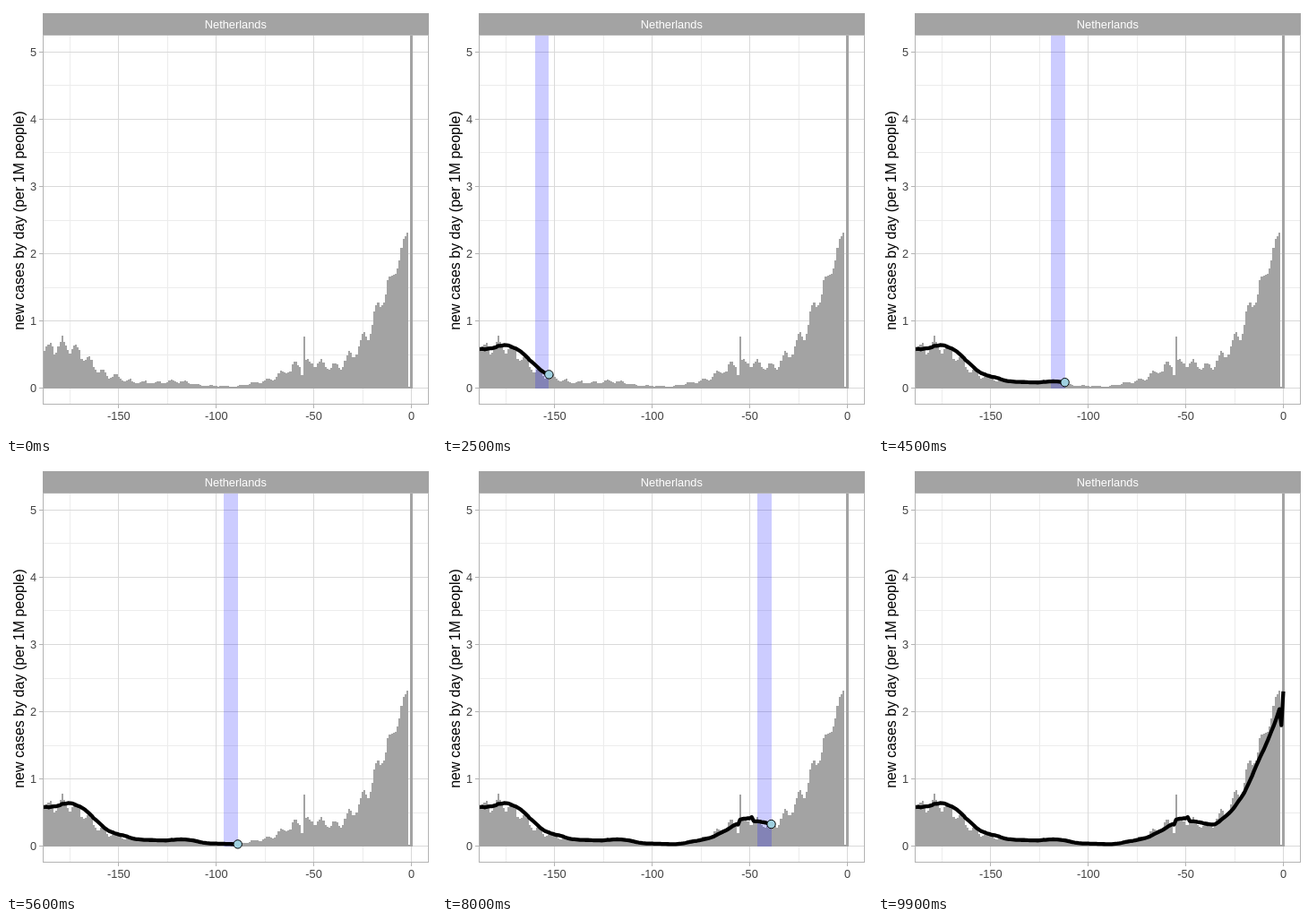
An HTML page with a canvas that plays this animation: 480x480 px, repeating every 10 s.

```html
<!DOCTYPE html>
<html lang="en">
<head>
<meta charset="utf-8">
<title>New cases by day</title>
<style>
html, body { margin: 0; width: 100%; height: 100%; overflow: hidden; background: #fff; }
canvas { display: block; }
</style>
</head>
<body>
<canvas width="480" height="480"></canvas>
<script>
const ctx = document.querySelector('canvas').getContext('2d');
const FONT = '"Liberation Sans", Arial, sans-serif';
const GREY = '#a3a3a3', BORDER = '#b3b3b3', TICK_TEXT = '#404040';
const FIRST = -196;
const LEFT = 41, TOP = 33, RIGHT = 471, BOTTOM = 445, BASE = 427;

const X = day => 452.45 + 2.177 * day;
const Y = value => 426.8 - 75.1 * value;
const snap = v => Math.floor(v) + 0.5;

// Smooth level of the epidemic as [day, cases]; bars add a weekly rhythm and noise.
const levels = [
  [-200, 0.58], [-186, 0.58], [-179, 0.67], [-170, 0.56], [-164, 0.36], [-158, 0.22],
  [-143, 0.1], [-127, 0.085], [-120, 0.115], [-108, 0.045], [-90, 0.03], [-73, 0.12],
  [-62, 0.28], [-57, 0.37], [-50, 0.37], [-38, 0.32], [-28, 0.56], [-22, 0.83],
  [-18, 1.14], [-7, 1.84], [0, 2.5]];
const outliers = { '-56': 0.2, '-55': 0.77, '-1': 0.02, 0: 5.3 };

function levelOn(day) {
  const i = levels.findIndex(([d]) => d >= day);
  const [d0, v0] = levels[i - 1] || levels[0];
  const [d1, v1] = levels[i];
  return v0 + (v1 - v0) * (day - d0) / (d1 - d0 || 1);
}

function noise(seed) {
  const v = Math.sin(seed * 12.9898) * 43758.5453;
  return 2 * (v - Math.floor(v)) - 1;
}

function casesOn(day) {
  if (day in outliers) return outliers[day];
  const level = levelOn(day);
  const ripple = 0.22 * Math.cos((day + 4) * 2 * Math.PI / 7) + 0.08 * noise(day);
  return level * (1 + ripple / (1 + level * level));
}

function weekMean(day) {
  let sum = 0;
  for (let d = day - 6; d <= day; d++) sum += casesOn(Math.max(d, FIRST));
  return sum / 7;
}

function line(x1, y1, x2, y2, color) {
  ctx.strokeStyle = color;
  ctx.lineWidth = 1;
  ctx.beginPath();
  ctx.moveTo(x1, y1);
  ctx.lineTo(x2, y2);
  ctx.stroke();
}

function label(text, x, y, align, color, size = 12.8) {
  ctx.font = `${size}px ${FONT}`;
  ctx.textAlign = align;
  ctx.fillStyle = color;
  ctx.fillText(text, x, y);
}

function drawGrid() {
  const vertical = (day, color) => line(snap(X(day)), TOP, snap(X(day)), BOTTOM, color);
  const horizontal = (v, color) => line(LEFT, snap(Y(v)), RIGHT, snap(Y(v)), color);
  for (let day = -175; day < 0; day += 50) vertical(day, '#ececec');
  for (let v = 0.5; v < 5; v++) horizontal(v, '#ececec');
  for (let day = -150; day <= 0; day += 50) vertical(day, '#d9d9d9');
  for (let v = 0; v <= 5; v++) horizontal(v, '#d9d9d9');
}

function drawBars() {
  ctx.fillStyle = GREY;
  for (let day = -190; day <= 0; day++) {
    const left = Math.round(X(day - 0.5));
    const top = Math.round(Y(casesOn(day)));
    ctx.fillRect(left, top, Math.round(X(day + 0.5)) - left, BASE - top);
  }
}

function drawWindow(day) {
  const left = Math.round(X(day - 7));
  ctx.fillStyle = 'rgba(0, 0, 255, 0.2)';
  ctx.fillRect(left, TOP, Math.round(X(day)) - left, BASE - TOP);
}

function drawTrend(day) {
  ctx.beginPath();
  for (let d = FIRST; d <= day; d++) ctx.lineTo(X(d), Y(weekMean(d)));
  ctx.strokeStyle = '#000';
  ctx.lineWidth = 4.27;
  ctx.lineJoin = 'round';
  ctx.stroke();
}

function drawDot(day) {
  ctx.beginPath();
  ctx.arc(X(day), Y(weekMean(day)), 4.7, 0, 2 * Math.PI);
  ctx.fillStyle = '#9fd0e0';
  ctx.fill();
  ctx.lineWidth = 1;
  ctx.stroke();
}

function drawFrame() {
  ctx.fillStyle = GREY;
  ctx.fillRect(41, 8, 431, 25);
  ctx.strokeStyle = BORDER;
  ctx.lineWidth = 1;
  ctx.strokeRect(41.5, 32.5, 430, 412);
  label('Netherlands', 256.3, 25, 'center', '#fff');
  for (let v = 0; v <= 5; v++) {
    line(37, snap(Y(v)), 41, snap(Y(v)), BORDER);
    label(v, 34, Y(v) + 4.6, 'right', TICK_TEXT);
  }
  for (let day = -150; day <= 0; day += 50) {
    line(snap(X(day)), 445, snap(X(day)), 449, BORDER);
    label(day, X(day), 462, 'center', TICK_TEXT);
  }
  ctx.save();
  ctx.translate(20, 239.5);
  ctx.rotate(-Math.PI / 2);
  label('new cases by day (per 1M people)', 0, 0, 'center', '#000', 16);
  ctx.restore();
}

function draw(time) {
  const step = Math.floor((time % 10000) / 100);
  const done = step === 99;
  const day = Math.round(-205.44 + 2.08 * step);
  ctx.fillStyle = '#fff';
  ctx.fillRect(0, 0, 480, 480);
  ctx.save();
  ctx.beginPath();
  ctx.rect(LEFT, TOP, RIGHT - LEFT, BOTTOM - TOP);
  ctx.clip();
  drawGrid();
  drawBars();
  if (!done) drawWindow(day);
  drawTrend(day);
  if (!done) drawDot(day);
  ctx.restore();
  drawFrame();
}

const start = performance.now();
function tick() {
  draw(performance.now() - start);
  requestAnimationFrame(tick);
}
tick();
</script>
</body>
</html>
```
